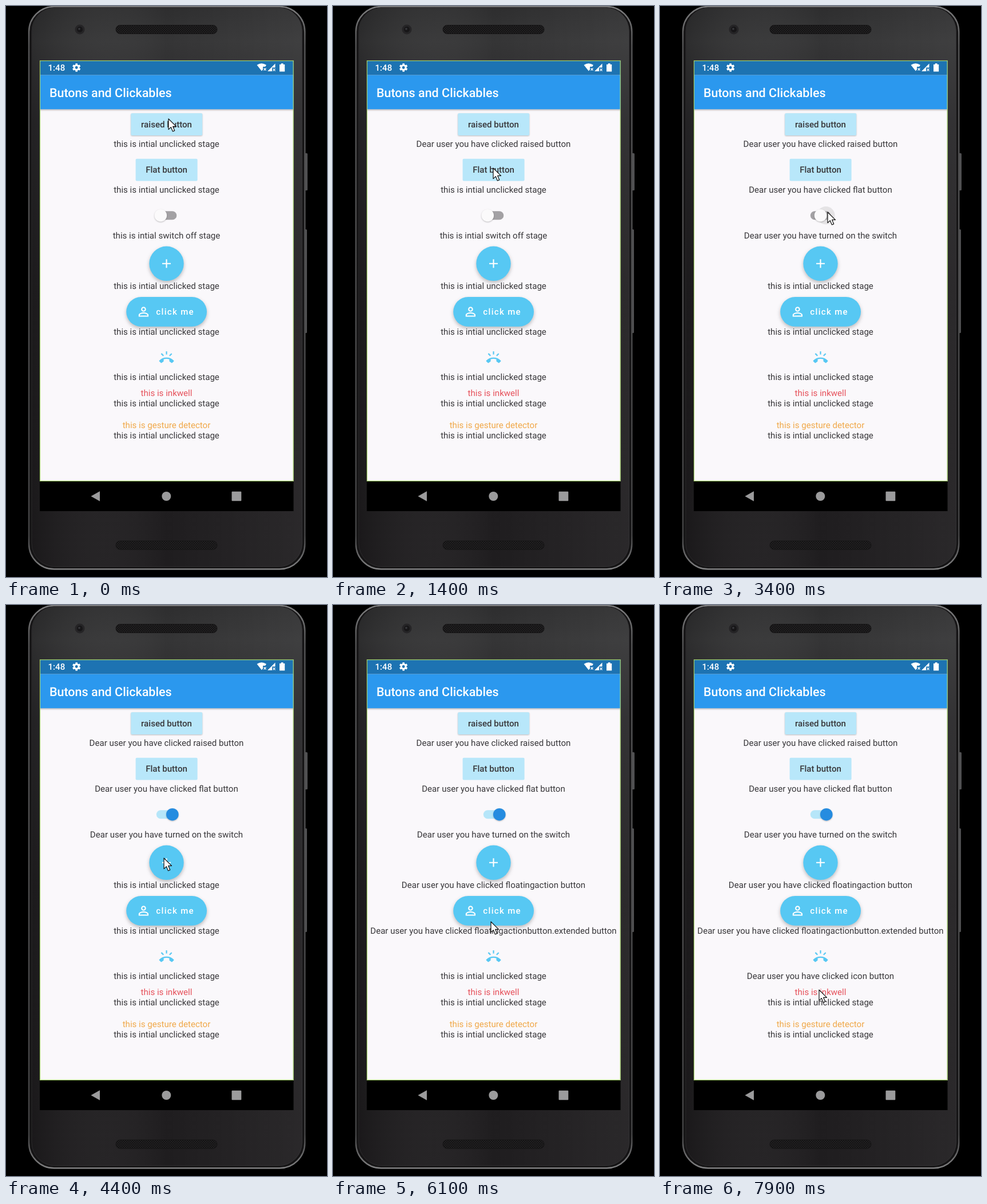
Write an HTML page that moves like this. It is 561x997 px and loops after 8000 ms.

```html
<!DOCTYPE html>
<html lang="en">
<head>
<meta charset="utf-8">
<title>Buttons demo</title>
<style>
  html, body { margin: 0; width: 100%; height: 100%; overflow: hidden; background: #000; }
  svg { display: block; width: 561px; height: 997px; }
  text { font-family: Roboto, sans-serif; font-size: 15.08px; fill: #38373a; text-rendering: geometricPrecision; }
  .mid { text-anchor: middle; }
  .med { font-weight: 500; }
  .lift { filter: drop-shadow(0 1px 1.2px rgba(0, 0, 0, .25)); }
  .float { filter: drop-shadow(0 3px 3px rgba(0, 0, 0, .25)); }
</style>
</head>
<body>
<svg viewBox="0 0 561 997">
  <defs>
    <linearGradient id="shell" x2="0" y2="1">
      <stop offset="0" stop-color="#2e2e2f"/>
      <stop offset=".06" stop-color="#353536"/>
      <stop offset=".2" stop-color="#29282a"/>
      <stop offset=".5" stop-color="#211f21"/>
      <stop offset="1" stop-color="#1f1d1f"/>
    </linearGradient>
    <linearGradient id="sheen">
      <stop offset="0" stop-color="#000" stop-opacity=".15"/>
      <stop offset=".5" stop-color="#fff" stop-opacity="0"/>
      <stop offset="1" stop-color="#fff" stop-opacity=".05"/>
    </linearGradient>
    <linearGradient id="rim" x2="0" y2="1">
      <stop offset="0" stop-color="#7c7c7d"/>
      <stop offset=".07" stop-color="#555556"/>
      <stop offset=".94" stop-color="#444445"/>
      <stop offset="1" stop-color="#808081"/>
    </linearGradient>
    <linearGradient id="under" x2="0" y2="1">
      <stop offset="0" stop-color="#000" stop-opacity=".25"/>
      <stop offset="1" stop-color="#000" stop-opacity="0"/>
    </linearGradient>
    <pattern id="mesh" width="4" height="4" patternUnits="userSpaceOnUse">
      <rect width="4" height="4" fill="#131213"/>
      <circle cx="1" cy="1" r=".8" fill="#343335"/>
      <circle cx="3" cy="3" r=".8" fill="#343335"/>
    </pattern>
    <clipPath id="clip0"><rect x="218.3" y="187.3" width="124.8" height="38.8" rx="2"/></clipPath>
    <clipPath id="clip1"><rect x="226.6" y="266.8" width="108" height="38.8" rx="2"/></clipPath>
    <clipPath id="clip3"><circle cx="280.5" cy="449.8" r="30.2"/></clipPath>
    <clipPath id="clip4"><rect x="210.2" y="508" width="140.8" height="51.7" rx="25.8"/></clipPath>
  </defs>

  <!-- phone -->
  <rect width="561" height="997"/>
  <rect x="521" y="257" width="6" height="65" rx="1.5" fill="#505052"/>
  <rect x="521" y="390" width="5" height="181" rx="1.5" fill="#505052"/>
  <rect x="40" y="1" width="482.3" height="982.3" rx="44" fill="#151415" stroke="url(#rim)" stroke-width="2.4"/>
  <rect x="45" y="3" width="472.5" height="976" rx="41" fill="url(#shell)" stroke="#2e2d2f"/>
  <rect x="45" y="3" width="472.5" height="976" rx="41" fill="url(#sheen)"/>
  <rect x="192" y="33.5" width="177" height="15" rx="7.5" fill="url(#mesh)" stroke="#151415"/>
  <rect x="192" y="934" width="177" height="15" rx="7.5" fill="url(#mesh)" stroke="#151415"/>
  <circle cx="129" cy="41" r="8.5" fill="#252426"/>
  <circle cx="129" cy="41" r="5" fill="#171618"/>
  <circle cx="128" cy="40" r="1.8" fill="#3a3a3e"/>

  <!-- screen -->
  <rect x="59" y="95" width="443.5" height="787"/>
  <rect x="59" y="95" width="443.5" height="735" fill="#faf8fb"/>
  <rect x="59" y="180" width="443.5" height="4" fill="url(#under)"/>
  <rect x="59" y="120.5" width="443.5" height="59.7" fill="#2b98ee"/>
  <rect x="59" y="95" width="443.5" height="25.5" fill="#1d73b2"/>
  <rect x="59.5" y="95.6" width="442.6" height="733.8" fill="none" stroke="#a2cf68" stroke-width="1.2"/>
  <text x="76" y="158.5" class="med" style="font-size:21.5px;fill:#fff">Butons and Clickables</text>

  <!-- status bar -->
  <text x="73.5" y="113" class="med" style="fill:#fff">1:48</text>
  <g id="gear" transform="translate(123.2 107.5)" fill="#fff">
    <circle r="3.9" fill="none" stroke="#fff" stroke-width="3"/>
  </g>
  <path d="M438.5 103Q446.5 97.5 455 103L453 106H449V111L446.8 113.5Z" fill="#fff"/>
  <path d="M450.5 108.5l4 4m0-4l-4 4M466.5 109.5l4 4m0-4l-4 4" stroke="#fff" stroke-width="1.2"/>
  <path d="M457 114L470.5 100.5V107.5H465V114Z" fill="#fff"/>
  <path d="M478 102h2.7v-1.8h3.8v1.8h2.7v12.5h-9.2z" fill="#fff"/>

  <!-- navigation bar -->
  <g fill="#9b9b9c">
    <path d="M148.5 856L164 847.3V864.8Z"/>
    <circle cx="280.3" cy="856" r="8"/>
    <rect x="394.5" y="847.8" width="16.8" height="16.5" rx="1"/>
  </g>

  <!-- controls -->
  <g class="lift"><rect x="218.3" y="187.3" width="124.8" height="38.8" rx="2" fill="#b8e7fa"/></g>
  <rect x="226.6" y="266.8" width="108" height="38.8" rx="2" fill="#b8e7fa"/>
  <g class="float" fill="#57c8f3">
    <circle cx="280.5" cy="449.8" r="30.2"/>
    <rect x="210.2" y="508" width="140.8" height="51.7" rx="25.8"/>
  </g>
  <rect id="track" x="262.8" y="358.2" width="35.5" height="15" rx="7.5"/>
  <g id="ripples"></g>
  <g class="lift"><circle id="thumb" cy="365.7" r="10.8"/></g>
  <text x="280.5" y="211.6" class="mid med">raised button</text>
  <text x="280.5" y="291.3" class="mid med">Flat button</text>
  <path d="M273 449.8h15m-7.5-7.5v15" stroke="#fff" stroke-width="2.1"/>
  <path transform="translate(227.5 520.9) scale(1.077)" fill="#fff" d="M12 5.9a2.1 2.1 0 1 1 0 4.2a2.1 2.1 0 1 1 0-4.2m0 9c2.97 0 6.1 1.46 6.1 2.1v1.1H5.9V17c0-.64 3.13-2.1 6.1-2.1M12 4a4 4 0 1 0 0 8a4 4 0 1 0 0-8zm0 9c-2.67 0-8 1.34-8 4v3h16v-3c0-2.66-5.33-4-8-4z"/>
  <text x="262.3" y="539.2" class="med" style="fill:#fff;letter-spacing:1.29px">click me</text>
  <g transform="translate(267.6 600.9) scale(1.077)" fill="#57c8f3">
    <path d="M23.7 16.7C20.7 13.8 16.5 12 12 12S3.3 13.8.3 16.7q-.6.7 0 1.4l2.5 2.5q.7.6 1.4 0 1.2-1.1 2.7-1.9.5-.3.5-.9v-3.1q4.6-1.4 9.2 0v3.1q0 .6.6.9 1.5.8 2.7 1.9.7.6 1.4 0l2.5-2.5q.5-.7-.1-1.4z"/>
    <path d="M21.2 6.3l-1.4-1.4-3.6 3.5 1.4 1.4zM13 2h-2v5h2zM6.4 9.8L7.8 8.4 4.3 4.8 2.8 6.3z"/>
  </g>
  <g id="labels"></g>
  <text x="280.5" y="681.4" class="mid" style="fill:#e6505a">this is inkwell</text>
  <text x="280.5" y="737.4" class="mid" style="fill:#f0a848">this is gesture detector</text>

  <path id="cursor" d="M0 0V18.6L4.3 14.6 7.4 22 10.7 20.6 7.7 13.4H13.5Z" fill="#fff" stroke="#111" stroke-width="1.2" stroke-linejoin="round"/>
</svg>
<script>
const LOOP = 8000, STEP = 100, NEVER = Infinity;
const $ = id => document.getElementById(id);

function add(parent, tag, attrs) {
  const el = document.createElementNS('http://www.w3.org/2000/svg', tag);
  for (const k in attrs) el.setAttribute(k, attrs[k]);
  return $(parent).appendChild(el);
}

const idle = 'this is intial unclicked stage';
const clicked = what => `Dear user you have clicked ${what} button`;

// baseline, time of change, text before, text after
const labels = [
  [246.3, 400, idle, clicked('raised')],
  [326, 1600, idle, clicked('flat')],
  [405.7, 3400, 'this is intial switch off stage', 'Dear user you have turned on the switch'],
  [494, 4600, idle, clicked('floatingaction')],
  [573.7, 5900, idle, clicked('floatingactionbutton.extended')],
  [653.4, 7100, idle, clicked('icon')],
  [698.6, NEVER, idle, ''],
  [754.6, NEVER, idle, '']
].map(([y, at, before, after]) => ({
  at, before, after, el: add('labels', 'text', { x: 280.5, y, class: 'mid' })
}));

// start, centre, end radius, clip index
const ripples = [
  [300, 284, 200, 72, 0],
  [1500, 280, 286, 60, 1],
  [3300, 290, 365.7, 21.5],
  [4500, 280.5, 449.8, 32, 3],
  [5800, 276, 528, 78, 4],
  [6900, 280.5, 613.8, 37.7]
].map(([at, cx, cy, r, clip]) => {
  const g = add('ripples', 'g', clip === undefined ? {} : { 'clip-path': `url(#clip${clip})` });
  const el = add('ripples', 'circle', { cx, cy, fill: '#bebebe' });
  g.appendChild(el);
  return { at, r, el };
});

for (let a = 0; a < 360; a += 60)
  add('gear', 'rect', { x: -1.8, y: -7.2, width: 3.6, height: 4, rx: .5, transform: `rotate(${a})` });

// pointer stops: time, x, y
const path = [
  [0, 284, 197], [400, 284, 197], [900, 280, 283], [1800, 280, 283],
  [2200, 283, 351], [2700, 292, 359], [2900, 293, 360], [3600, 293, 360],
  [4100, 276, 442], [4600, 276, 442], [5000, 276, 506], [5500, 276, 520],
  [5900, 276, 520], [6100, 276, 553], [6500, 277, 612], [7200, 277, 612],
  [7700, 278, 669], [7900, 278, 672], [LOOP, 278, 672]
];

const clamp = v => Math.min(1, Math.max(0, v));
const ease = v => v * v * (3 - 2 * v);
const mix = (a, b, p) => a + (b - a) * p;

function draw(t) {
  for (const l of labels) {
    const s = t < l.at ? l.before : l.after;
    if (l.el.textContent !== s) l.el.textContent = s;
  }
  for (const r of ripples) {
    const age = t - r.at;
    r.el.setAttribute('r', r.r * mix(.45, 1, clamp(age / 200)));
    r.el.setAttribute('opacity', age < 0 ? 0 : .35 * clamp((300 - age) / 200));
  }

  const on = ease(clamp((t - 3300) / 200));
  $('thumb').setAttribute('cx', mix(270.3, 290.8, on));
  $('thumb').setAttribute('fill', on > .5 ? '#258ce0' : '#fbfafb');
  $('track').setAttribute('fill', on > .5 ? '#b6e6f9' : '#a3a1a4');

  const i = path.findIndex((p, n) => t < path[n + 1][0]);
  const [t0, x0, y0] = path[i], [t1, x1, y1] = path[i + 1];
  const p = ease((t - t0) / (t1 - t0));
  $('cursor').setAttribute('transform', `translate(${mix(x0, x1, p)} ${mix(y0, y1, p)})`);
}

const start = performance.now();
function tick() {
  const t = (performance.now() - start) % LOOP;
  draw(Math.floor(t / STEP) * STEP);
  requestAnimationFrame(tick);
}
tick();
</script>
</body>
</html>
```
